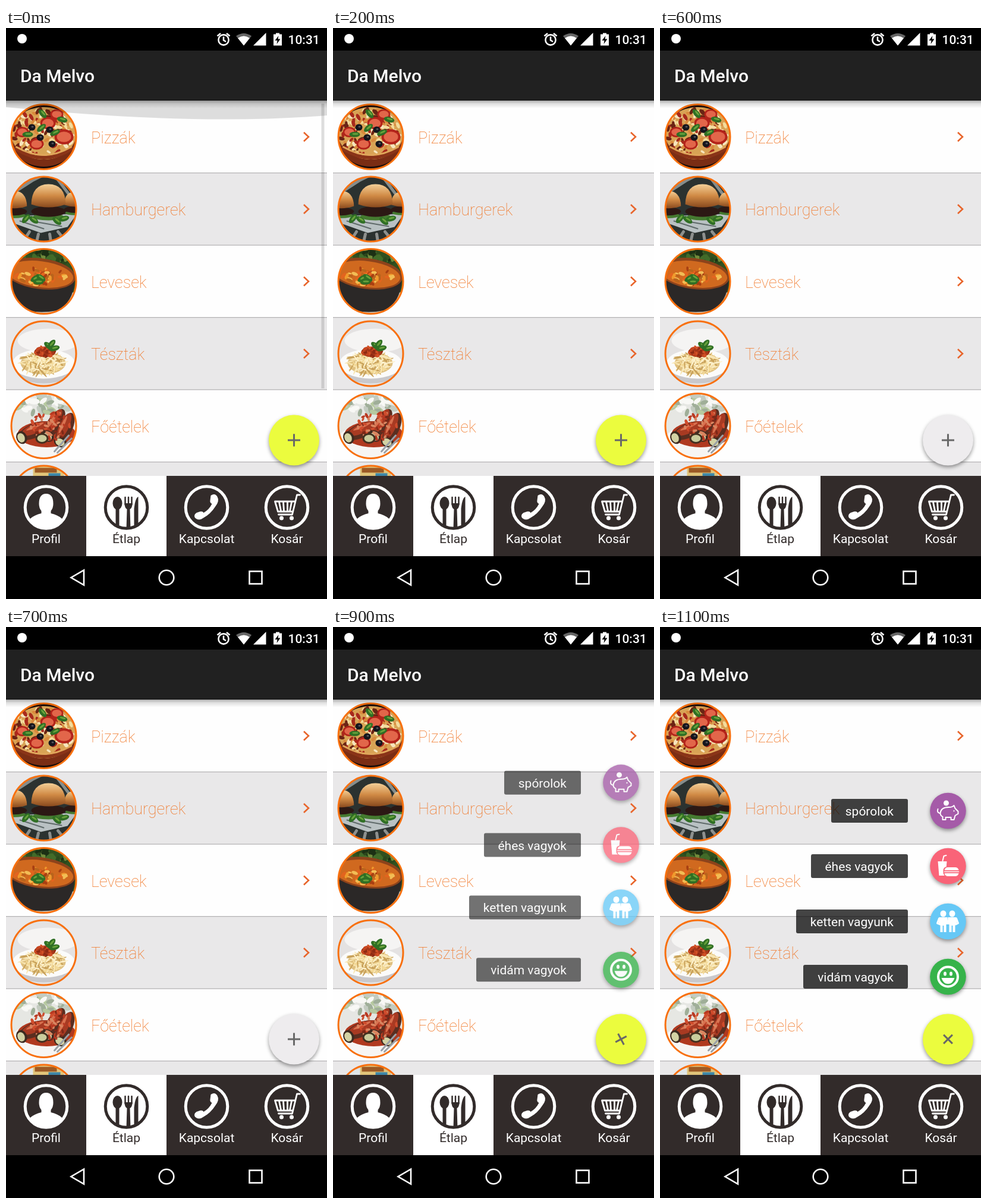
Animation of 540 by 960 pixels, one loop 1.2 s. Source, as an HTML page:

```html
<!DOCTYPE html>
<html lang="hu">
<head>
<meta charset="utf-8">
<title>Étlap</title>
<style>
  html, body { margin: 0; width: 100%; height: 100%; overflow: hidden; background: #000; }
  svg { display: block; width: 540px; height: 960px; font-family: Roboto, sans-serif; font-size: 21px; }
  .line { fill: none; stroke: #fff; stroke-width: 2.6; }
  .round { stroke-linecap: round; stroke-linejoin: round; }
  .raised { filter: drop-shadow(0 3px 3px rgba(0, 0, 0, .4)); }
  .dish { font-size: 27px; font-weight: 250; fill: #f0701c; }
</style>
</head>
<body>
<svg viewBox="0 0 540 960">
  <defs>
    <clipPath id="disc"><circle r="54.5"/></clipPath>
    <clipPath id="badge"><circle r="34"/></clipPath>
    <linearGradient id="shade" x2="0" y2="1">
      <stop stop-opacity=".36"/><stop offset=".45" stop-opacity=".12"/><stop offset="1" stop-opacity="0"/>
    </linearGradient>
    <linearGradient id="bun" x2="0" y2="1">
      <stop stop-color="#f3cf97"/><stop offset=".5" stop-color="#d08a45"/><stop offset="1" stop-color="#8a4a1e"/>
    </linearGradient>
  </defs>

  <g id="list"></g>
  <g id="scroll">
    <path d="M0 121V133Q320 165 540 147V121Z" fill="#000" opacity=".13"/>
    <rect x="530.5" y="127" width="5" height="479" fill="#000" opacity=".13"/>
  </g>
  <rect y="121" width="540" height="14" fill="url(#shade)"/>

  <!-- top bars -->
  <rect width="540" height="38"/>
  <rect y="38" width="540" height="83.500" fill="#212121"/>
  <text x="24" y="91" font-size="30" font-weight="500" fill="#fff">Da Melvo</text>
  <g fill="#fff">
    <circle cx="27" cy="18" r="8"/>
    <g class="line">
      <circle cx="366" cy="20" r="8.6"/>
      <path d="M366 14.5V20.5L370 23M355.500 13.500L361 9M376.500 13.500L371 9"/>
    </g>
    <path d="M387 13.500Q400 4.500 413 13.500L400 29.500Z" opacity=".4"/>
    <path d="M390 17Q400 10 410 17L400 29.500Z"/>
    <path d="M437.500 8V29.500H416Z"/>
    <path d="M450 10.500H454V8.500H460V10.500H464V29.500H450Z"/>
    <path d="M458.500 13L452.500 21H456.500L455.500 27L461.500 18.500H457.500Z" fill="#000"/>
    <text x="474.500" y="27" font-weight="500">10:31</text>
  </g>

  <g id="menu"></g>
  <g transform="translate(484.500 693)">
    <circle id="fab" class="raised" r="42.500"/>
    <path id="plus" d="M-10.500 0H10.500M0 -10.500V10.500" stroke="#686868" stroke-width="3"/>
  </g>

  <!-- bottom bars -->
  <rect y="753" width="540" height="135" fill="#322b2a"/>
  <rect x="135" y="753" width="135" height="135" fill="#fff"/>
  <g id="tabs" text-anchor="middle"></g>
  <rect y="888" width="540" height="72"/>
  <g class="line">
    <path d="M131 911.500V936.500L109.500 924Z"/>
    <circle cx="270" cy="924" r="12.300"/>
    <rect x="409.500" y="913.500" width="21" height="21"/>
  </g>
</svg>

<script>
const $ = id => document.getElementById(id);
const oval = (x, y, rx, ry, fill, turn = 0) =>
  `<ellipse rx="${rx}" ry="${ry}" fill="${fill}" transform="translate(${x} ${y}) rotate(${turn})"/>`;
const shape = (d, fill) => `<path d="${d}" fill="${fill}"/>`;
const stroke = (d, color, width) =>
  `<path class="round" d="${d}" fill="none" stroke="${color}" stroke-width="${width}"/>`;

// Small seeded pieces spread evenly over an ellipse
function scatter(n, seed, [x, y, rx, ry], size, colors, thin = .5) {
  const rnd = () => (seed = seed * 16807 % 2147483647) / 2147483647;
  let out = '';
  for (let i = 0; i < n; i++) {
    const a = rnd() * 2 * Math.PI, d = Math.sqrt(rnd()), long = size * (.7 + rnd() * .6);
    out += oval(x + d * rx * Math.cos(a), y + d * ry * Math.sin(a),
      long, long * thin, colors[i % colors.length], rnd() * 180);
  }
  return out;
}

const backdrop = color => oval(0, 0, 56, 56, color);
const tomato = (x, y, r) => oval(x, y, r, r * .8, '#b3231a') + oval(x, y, r * .75, r * .55, '#e2664a');
const olive = (x, y) => oval(x, y, 6, 5.500, '#15151c') + oval(x + 1, y - 1, 2, 1.500, '#53535c');
const leaf = (x, y, turn) => oval(x, y, 9, 4.500, '#2f6f24', turn) + oval(x + 1, y - 1, 5, 1.500, '#69a23c', turn);
const burger = (x, y, s) => `<g transform="translate(${x} ${y}) scale(${s})">` +
  oval(0, 33, 26, 6, '#457a30') + oval(0, 24, 29, 9, '#2c1814') +
  shape('M-29 12Q-28 -22 0 -22Q28 -22 29 12Q0 22 -29 12Z', 'url(#bun)') + '</g>';
const roll = (x, y, turn) => `<g transform="translate(${x} ${y}) rotate(${turn})">` +
  oval(0, 0, 28, 12, '#5b2e20') + oval(2, -3, 24, 8, '#a83a22') + oval(4, -6, 16, 2.500, '#d9714f') +
  oval(-24, 2, 9, 11, '#3d2a20') + oval(-25, 2, 6, 8, '#d3d2a4') + '</g>';

const dishes = [
  ['Pizzák', backdrop('#1d0e0a') + oval(0, 5, 55, 45, '#7a2d14') + oval(0, -6, 55, 44, '#d8a355') +
    scatter(150, 11, [0, -6, 52, 41], 5, ['#f3dc9c', '#a82a1c', '#d98a3d', '#f7e5bd', '#6b2414']) +
    tomato(7, -23, 13) + tomato(34, 0, 16) + tomato(22, -38, 11) + tomato(-36, -8, 11) + tomato(-12, 12, 12) +
    [[-20, -16], [10, -12], [-6, 1], [14, 12]].map(p => olive(...p)).join('') +
    leaf(-27, -4, 0) + leaf(-2, -39, 50) + leaf(19, -7, -25) + leaf(31, -29, 15) + leaf(-4, -15, -40) +
    stroke('M-47 20Q0 50 47 20', '#8a3418', 6) + stroke('M-46 17Q0 44 46 17', '#e0a65a', 3)],
  ['Hamburgerek', backdrop('#2b3230') + stroke('M-50 -28L-10 -54M-40 -38L5 -60M22 -52L46 -20', '#858d8c', 5) +
    shape('M-56 12L56 8L40 30L-5 40L-50 24Z', '#b9c1c3') + stroke('M-40 20L0 33M-10 22L30 29', '#5f6a6a', 2) +
    stroke('M-35 55L-24 38M-12 55L-9 42M12 55L10 42M32 48L24 38', '#8d908e', 5) +
    burger(-50, -14, .75) + burger(53, -15, .65) + burger(8, -20, 1) +
    leaf(-30, 16, -50) + leaf(-17, 18, 35) + leaf(34, 16, -15) + leaf(22, 20, 40)],
  ['Levesek', backdrop('#31511f') + scatter(60, 5, [0, -38, 55, 20], 7, ['#426b29', '#1c3014', '#718b3b', '#2b481c']) +
    shape('M-60 24L60 18V60H-60Z', '#c9c4b8') + shape('M-60 -14L52 -2Q50 36 22 49Q-15 56 -40 44Q-58 26 -60 -14Z', '#2b2827') +
    oval(-6, -13, 60, 26, '#8d431b', 7) + oval(-6, -12, 56, 22, '#d0691f', 7) +
    scatter(60, 8, [-6, -8, 44, 14], 4.500, ['#f09a2d', '#a83f12', '#f2bd55', '#e3641e', '#b9641c']) +
    leaf(-14, -5, -30) + leaf(-5, -6, 35) + leaf(-9, 1, 0)],
  ['Tészták', backdrop('#e4e2e2') + oval(8, -22, 52, 20, '#f5f4f3') + oval(0, 24, 54, 26, '#c9c8cb') + oval(0, 17, 53, 25, '#fbfbfa') +
    oval(-1, 16, 38, 19, '#dfc080') + scatter(150, 21, [-1, 15, 35, 17], 9, ['#f8e7b6', '#c9a25a', '#f3d997', '#fdf1cc'], .13) +
    oval(2, -3, 18, 9, '#a3371a') + scatter(40, 9, [2, -3, 17, 9], 3, ['#d35226', '#8e2a13', '#c64520']) +
    leaf(8, -13, 40) + leaf(18, -9, -15) + leaf(13, -16, -50)],
  ['Főételek', backdrop('#e6e7e3') + scatter(40, 31, [-8, -36, 48, 18], 8, ['#b6c99f', '#f8f8f5', '#c3cbc0', '#9fae98']) +
    oval(0, 25, 56, 28, '#f7f5f3') + oval(5, 14, 49, 22, '#b0391f') + roll(-16, 8, -24) + roll(18, -4, -57) + roll(36, 4, -65) +
    scatter(60, 14, [12, 0, 34, 24], 4, ['#d04c2c', '#7d2817', '#b83922', '#d98560']) + oval(-3, 21, 11, 9, '#43301f') +
    oval(-3, 21, 8, 6, '#c9cc9c') + stroke('M18 43L42 16M23 45L47 21', '#9aa0a7', 3)],
  ['', backdrop('#dfe6e9') + shape('M-18 -56H34V-30H-18Z', '#e0c47a') + shape('M-15 -51H22V-43H-15Z', '#9c5a25') +
    shape('M8 -42H28V-30H8Z', '#3d87a8')]
];

$('list').innerHTML = dishes.map(([name, photo], i) => {
  const y = 122 + i * 121.500;
  return `<g transform="translate(0 ${y})">
    <rect width="540" height="122" fill="${i % 2 ? '#e9e8e9' : '#fefefe'}"/>
    ${i ? '<path d="M0 -.5H540V.7H0Z" fill="#b4b3b4"/>' : ''}
    <g transform="translate(63.500 61)"><g clip-path="url(#disc)">${photo}</g>
      <circle r="54.500" fill="none" stroke="#f8700e" stroke-width="3"/></g>
    <text class="dish" x="143" y="71.500">${name}</text>
    <path d="M501 53.500L509 61L501 68.500" fill="none" stroke="#e8642a" stroke-width="2.600"/></g>`;
}).join('');

const dark = '#322b2a';
const tabs = [
  ['Profil', shape('M-35 36Q-33 16 -8 10V6Q-12 1 -12 -6Q-12 -23 0 -23Q12 -23 12 -6Q12 1 8 6V10Q33 16 35 36Z', '#fff')],
  ['Étlap', oval(-15, -7, 8, 11, dark) + stroke('M-15 0V36', dark, 6) +
    stroke('M-2 -17V-5M3.500 -17V-5M9 -17V-5', dark, 2.500) + shape('M-3 -7H10Q10 1 6 3L7 36H0L1 3Q-3 1 -3 -7Z', dark) +
    shape('M13 36V2Q15 -16 20 -18V36Z', dark)],
  ['Kapcsolat', shape('M7 -20Q14 -25 18 -18Q22 -11 15 -2Q7 11 -6 18Q-13 23 -19 18Q-23 13 -17 9L-11 7Q-7 6 -5 9Q4 4 9 -6Q5 -8 6 -12Z', '#fff')],
  ['Kosár', stroke('M22 -21H17L9 12H-14M-20 -10H13M-20 -10L-15 7H10M-13 -9L-10 6M-6 -9L-5 6M1 -9V6M8 -9L5 6', '#fff', 2.800) +
    oval(-9, 18, 3.500, 3.500, '#fff') + oval(8, 18, 3.500, 3.500, '#fff')]
];

$('tabs').innerHTML = tabs.map(([name, icon], i) => {
  const ink = i === 1 ? dark : '#fff';
  return `<g transform="translate(${67.500 + i * 135} 806)">
    <g clip-path="url(#badge)">${icon}</g>
    <circle r="35.300" fill="none" stroke="${ink}" stroke-width="5"/>
    <text y="60" fill="${ink}">${name}</text></g>`;
}).join('');

const person = x => oval(x, -13, 5, 5.500, '#fff') +
  shape(`M${x - 7} -7H${x + 7}L${x + 8} 5H${x + 5}V18H${x + 1}V7H${x - 1}V18H${x - 5}V5H${x - 8}Z`, '#fff');
const options = [
  ['spórolok', 129, '#a55ba8', oval(-3, -13, 4.500, 4.500, '#fff') +
    stroke('M-17 -3Q-19 3 -14 4M-13 4Q-12 -6 1 -6Q8 -6 10 -9L12 -4L17 1V5L12 8L10 15H5V11H-4V15H-9V10Q-13 8 -13 4ZM10 0V.5', '#fff', 2)],
  ['éhes vagyok', 163, '#f96478', shape('M-17 -8H-2L-4 16H-15Z', '#fff') + stroke('M-9 -9L-7 -17L-3 -18', '#fff', 2) +
    '<rect x="-8" y="1" width="27" height="16" rx="6" fill="#f96478"/>' +
    shape('M-6 7Q-5 2 0 2H12Q17 2 18 7ZM-6 12H18Q17 17 12 17H0Q-5 17 -6 12Z', '#fff') + stroke('M-6 9.500H18', '#fff', 1.500)],
  ['ketten vagyunk', 188, '#66c8f6', person(-8) + person(7) + stroke('M-15 -5L-18 3L-13 5M14 -5L17 3L13 5', '#fff', 3)],
  ['vidám vagyok', 176, '#36b34a', '<circle class="line" r="16.500" style="stroke-width:4"/>' +
    oval(-5, -5, 2.500, 3.500, '#fff') + oval(5, -5, 2.500, 3.500, '#fff') + shape('M-11 2H11Q8 12 0 12Q-8 12 -11 2Z', '#fff')]
];

$('menu').innerHTML = options.map(([label, width, color, icon]) => `<g>
  <rect x="${417 - width}" y="-20" width="${width}" height="40" rx="3" fill="#000" opacity=".73"/>
  <text x="393" y="8" text-anchor="end" fill="#fff">${label}</text>
  <g transform="translate(484.500 0)"><circle class="raised" r="30.300" fill="${color}"/>${icon}</g></g>`).join('');
const items = [...$('menu').children];

const LOOP = 1200, STEP = 100, OPEN = 751, OPEN_TIME = 290, HOME = 679;
const overshoot = t => (t - 1) ** 2 * (3 * (t - 1) + 2) + 1;

function draw(now) {
  const time = Math.floor(now % LOOP / STEP) * STEP;
  const t = Math.min(1, Math.max(0, (time - OPEN) / OPEN_TIME));
  const p = overshoot(t);
  $('scroll').setAttribute('opacity', Math.max(0, 1 - time / 180));
  $('fab').setAttribute('fill', time >= 600 && time < OPEN ? '#eeecee' : '#ebfc3e');
  $('plus').setAttribute('transform', `rotate(${135 * p})`);
  $('menu').setAttribute('opacity', 1 - (1 - t) ** 2);
  items.forEach((item, i) => {
    const y = HOME + (309 + i * 93 - HOME) * p;
    item.setAttribute('transform', `translate(0 ${y})`);
  });
}

const start = performance.now();
function tick() {
  draw(performance.now() - start);
  requestAnimationFrame(tick);
}
tick();
</script>
</body>
</html>
```
